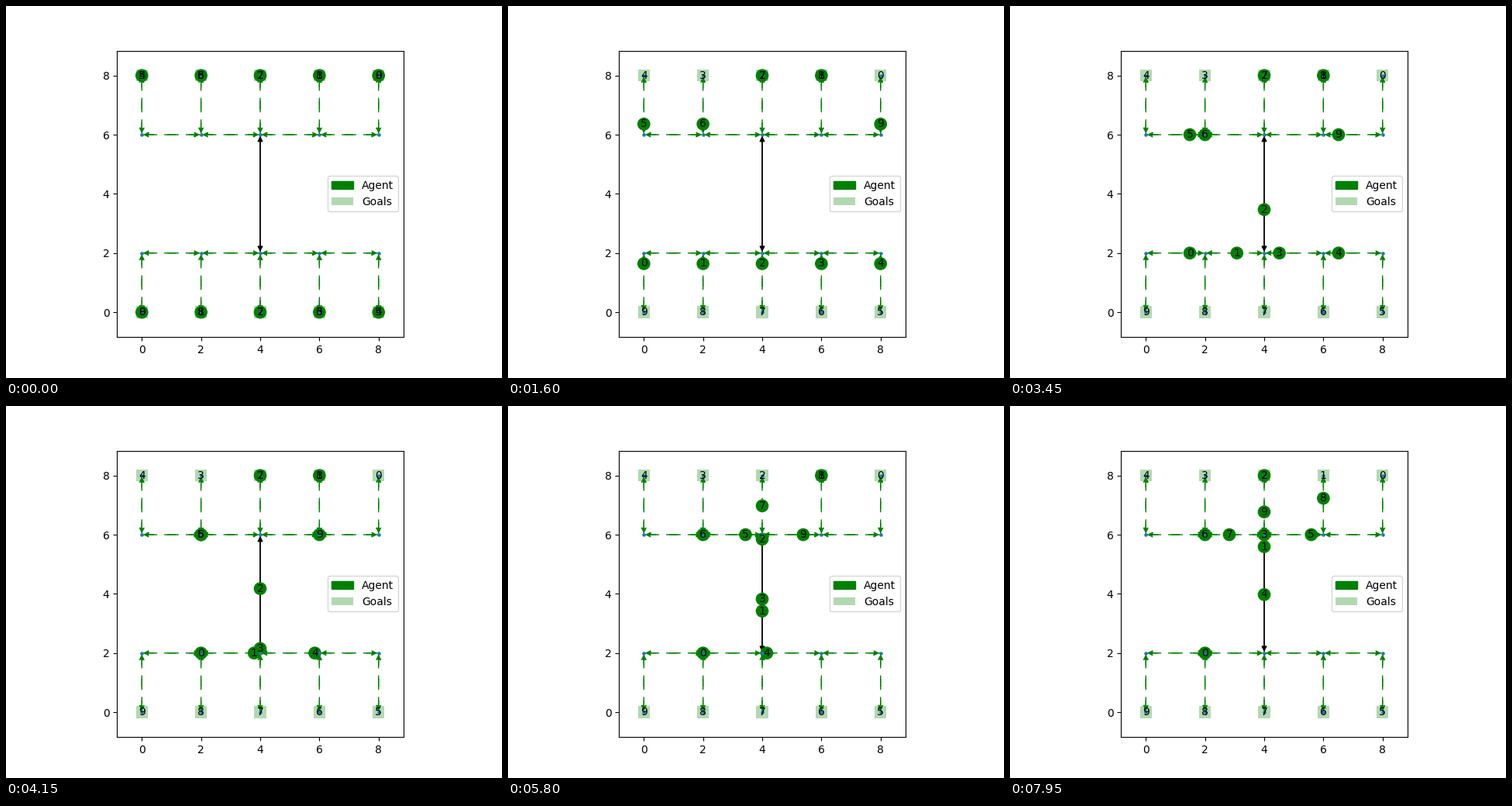
A matplotlib script that plays this animation: 640x480 px, repeating every 8000 ms.

```python
import math

import matplotlib.pyplot as plt
from matplotlib.animation import FuncAnimation
from matplotlib.patches import Circle, FancyArrowPatch, Patch, Rectangle

FRAMES, INTERVAL = 160, 50
FRAMES_PER_UNIT = 20
WAIT_FRAMES = 8
NODE_SIZE = 5
COLUMNS = range(0, 9, 2)
ROWS = (0, 2, 6, 8)

# One plan per agent: letters move to the next node, digits wait.
PLANS = "UR U1RU UUU ULU ULLU DR1RR D 93DL 99D DL3LU".split()


def start_node(i):
    return 2 * (i % 5), 8 * (i // 5)


def next_node(x, y, move):
    if move in "LR":
        return x + (2 if move == "R" else -2), y
    return x, ROWS[ROWS.index(y) + (1 if move == "U" else -1)]


def position(i, frame):
    x, y = start_node(i)
    for step in PLANS[i]:
        if step.isdigit():
            frame -= WAIT_FRAMES * int(step)
            continue
        if frame < 0:
            break
        tx, ty = next_node(x, y, step)
        count = FRAMES_PER_UNIT * (abs(tx - x) + abs(ty - y))
        if frame < count:
            u = frame / (count - 1)
            return x + (tx - x) * u, y + (ty - y) * u
        x, y = tx, ty
        frame -= count
    return x, y


fig, ax = plt.subplots(figsize=(6.4, 4.8), dpi=100)
ax.set_aspect("equal")


def add_edge(a, b, color, style):
    shrink = math.sqrt(NODE_SIZE) / 2
    for start, end in ((a, b), (b, a)):
        ax.add_patch(FancyArrowPatch(
            start, end, arrowstyle="-|>", mutation_scale=10,
            shrinkA=shrink, shrinkB=shrink, color=color,
            linewidth=1, linestyle=style, zorder=1))


def add_label(x, y, text):
    return ax.text(x, y, text, ha="center", va="center")


# Leave 5% around the nodes on top of the default axes margin.
ax.update_datalim([(-0.4, -0.4), (8.4, 8.4)])
ax.autoscale_view()

dashes = (0, (10, 10))
for x in COLUMNS:
    for low in (0, 6):
        add_edge((x, low), (x, low + 2), "green", dashes)
    if x < 8:
        for y in (2, 6):
            add_edge((x, y), (x + 2, y), "green", dashes)
add_edge((4, 2), (4, 6), "black", "solid")
nodes = [(x, y) for y in ROWS for x in COLUMNS]
ax.scatter(*zip(*nodes), s=NODE_SIZE, color="#1f78b4", zorder=2)

# Every agent's goal is diagonally opposite its start.
for i in range(len(PLANS)):
    x, y = start_node(i)
    gx, gy = 8 - x, 8 - y
    ax.add_patch(Rectangle((gx - 0.2, gy - 0.2), 0.4, 0.4,
                           facecolor="green", linewidth=0, alpha=0.3))
    add_label(gx, gy, str(i))

agents = []
for i in range(len(PLANS)):
    start = start_node(i)
    disc = ax.add_patch(Circle(start, 0.2, facecolor="green",
                               edgecolor="green", linewidth=1))
    agents.append((disc, add_label(*start, str(i))))

ax.legend(handles=[
    Patch(color="green", label="Agent"),
    Patch(facecolor="green", linewidth=0, alpha=0.3, label="Goals"),
], loc="center right")


def update(frame):
    for i, (disc, label) in enumerate(agents):
        point = position(i, frame)
        disc.center = point
        label.set_position(point)
    return [artist for pair in agents for artist in pair]


anim = FuncAnimation(fig, update, frames=FRAMES, interval=INTERVAL,
                     repeat=True, repeat_delay=0)
plt.show()
```
